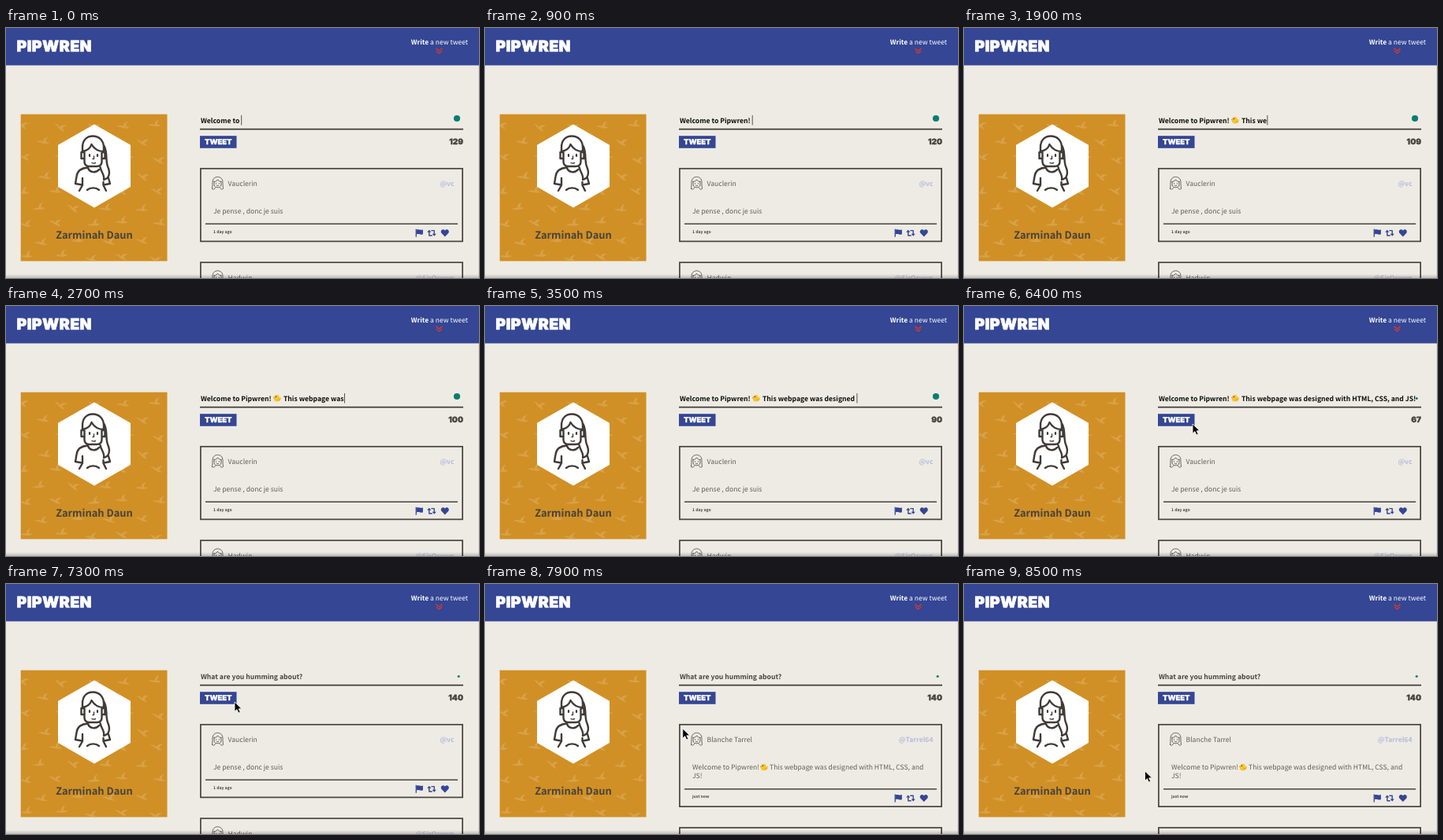
An HTML page that plays this animation: 600x318 px, repeating every 9100 ms.

```html
<!DOCTYPE html>
<html lang="en">
<head>
<meta charset="utf-8">
<title>Pipwren</title>
<style>
  html, body { margin: 0; width: 100%; height: 100%; overflow: hidden; background: #eeebe4; }
  svg { display: block; width: 100vw; height: 100vh; }
  text {
    font-family: "Noto Sans CJK JP", "Noto Sans CJK SC", "Noto Sans CJK", "Noto Sans", sans-serif;
    font-size: 8.6px; fill: #47423d; white-space: pre; text-rendering: geometricPrecision;
  }
  .bold { font-weight: 700; font-size: 8.6px; }
  .light { font-weight: 300; fill: #635d57; }
  .end { text-anchor: end; }
  .typed { fill: #0c0c0c; }
  .handle { fill: #b7bbdd; }
  .white { fill: #fff; }
  .block { font-family: Inter, "DejaVu Sans", sans-serif; font-weight: 900; stroke-linejoin: round; }
</style>
</head>
<body>
<svg id="stage" viewBox="0 0 600 318" preserveAspectRatio="none"></svg>
<script>
const LOOP = 9100, STEP = 100;
const INK = '#47423d', BLUE = '#344694', TEAL = '#087f6c';
const INTRO = 'Welcome to Pipwren! ';
const REST = 'This webpage was designed with HTML, CSS, and JS!';
const BIRD_LEN = 2, GAP_LEN = 2, LIMIT = 140, REST_X = 352;
const BIRD_END = INTRO.length + BIRD_LEN;

// Time, number of characters
const TYPING = [[0, 11], [1900, 31], [3500, 50], [4000, 57], [5200, 69], [5600, 73]];
// Time, x, y of the pointer tip
const POINTER = [[5800, 330, 187], [6000, 316, 184], [6200, 301, 168], [6400, 290, 150],
                 [7400, 290, 150], [7800, 258, 176], [8200, 229, 208], [8500, 229.5, 238]];
const SENT = 7100, POSTED = 7400, CARET_OFF = 6200;

const text = (x, y, str, cls = '', more = '') =>
  `<text x="${x}" y="${y}" class="${cls}" ${more}>${str}</text>`;
const rect = (x, y, w, h, fill) =>
  `<rect x="${x}" y="${y}" width="${w}" height="${h}" fill="${fill}"/>`;
const line = (d, color, width) =>
  `<path d="${d}" fill="none" stroke="${color}" stroke-width="${width}" stroke-linecap="round" stroke-linejoin="round"/>`;
const at = (x, y, body, more = '') => `<g transform="translate(${x} ${y}) ${more}">${body}</g>`;

function random(seed) {
  return () => (seed = (seed * 16807) % 2147483647) / 2147483647;
}

function chick(x, y) {
  return at(x, y, `
    <path d="M-1 -4.3C2 -4.6 3 -2.4 2.6 -1L4.8 -1.2C5 2.6 3 4.3 -.2 4.3C-3.4 4.3 -4.6 2 -4 .2C-4.6 -2.2 -3.4 -4.1 -1 -4.3Z" fill="#f7c531"/>
    <path d="M.2 .8C1.6 2.4 3.2 1.8 3.9 .5C4 3 1.2 3.6 .2 .8Z" fill="#e2922a"/>
    <path d="M-3.9 -1.6L-5.2 -.4L-3.4 .2Z" fill="#e2662a"/>
    <circle cx="-1.6" cy="-1.8" r=".7" fill="#3a2a1c"/>`);
}

function actions(y) {
  return `<g fill="${BLUE}">
    <path d="M519.6 ${y - 5}h1.3v10h-1.3zM521 ${y - 4.2}c2.6 -1.2 4.2 1.2 7.9 -.2v5.8c-3.6 1.5 -5.2 -1 -7.9 .2z"/>
    <path d="M556.8 ${y + 4.6}l-4.3 -4.4c-2.4 -2.9 1.6 -6.8 4.3 -3.5c2.7 -3.3 6.7 .6 4.3 3.5z"/>
    <path d="M534.2 ${y - 1}l2.6 -3l2.6 3zM540.6 ${y + 1}l2.6 3l2.6 -3z"/></g>` +
    line(`M536.8 ${y - 1.4}v4.6h3.4M543.2 ${y + 1.4}v-4.6h-3.4`, BLUE, 1.4);
}

const face = (x, y) => at(x, y, line(
  `M-4.4 -2.4V2C-4.4 6 4.4 6 4.4 2V-2.4
   M-4.6 -2.4C-2 -2.4 -.6 -3.6 0 -5C.8 -3.4 2.4 -2.4 4.6 -2.4
   M-7 6.6C-6.4 3 -6.6 0 -6.4 -2.4C-6 -10.4 6 -10.4 6.4 -2.4C6.6 0 6.4 3 7 6.6C5.600 7.800 4 7.600 3 5.800M-7 6.6C-5.6 7.8 -4 7.6 -3 5.8
   M-1.9 -.2v.6M1.9 -.2v.6M-1.2 2.6Q0 3.4 1.2 2.6`, INK, 0.8));

// y is the top of the card's outer edge
function card(y, name, handle, body, ago, extra = 0) {
  return `<rect x="246.9" y="${y + 1}" width="332.2" height="${92.6 + extra}" fill="none" stroke="${INK}" stroke-width="1.7"/>` +
    face(268.5, y + 20) +
    text(281.5, y + 23.5, name, 'light') +
    text(568.5, y + 23.5, handle, 'bold handle end') +
    body +
    rect(253, y + 70.6 + extra, 320, 1.5, INK) +
    text(263, y + 82.8 + extra, ago, 'bold', 'style="font-size:5.1px"') +
    actions(y + 83 + extra);
}

function birds() {
  const rnd = random(41);
  let out = '';
  for (let row = 0; row < 9; row++) {
    for (let col = 0; col < 5; col++) {
      const x = 28 + col * 42 + (row % 2) * 21 - 8 + rnd() * 8;
      const y = 120 + row * 21 + rnd() * 7;
      out += at(x, y, '<path d="M-10 -1C-6 -3 -2 -2 0 0C1 -4 4 -6 9 -6C6 -4 4.5 -2 4 1C6 1 7 2 9 4C5 4 2 4 0 2.5C-3 2 -5 -1 -10 -1Z"/>',
        `rotate(${Math.round(rnd() * 50 - 25)}) scale(.85)`);
    }
  }
  return `<g fill="#d8a858" opacity=".75" clip-path="url(#panel)">${out}</g>`;
}

const portrait = line(
  `M97 157V152C97 142 103 137.500 110 137.500C119 137.500 124 144 124 152V157
   M97 157C103 156 107 153 108.500 148C112 154 117 157 124 157
   M95.500 158h4v8h-4zM121.500 158h4v8h-4z
   M99.500 166V170C99.500 174 102 176 106 176H115C119 176 121.500 174 121.500 170V166
   M124.500 150C129 158 126 168 129 176C132.500 184 131.500 191 124 193C125.500 187 121 184 119.500 177
   M104 177.500C96 178 90.500 181 89.500 189L88 198L96.500 199.500M97 191V200L93 207
   M104 178C106 184 114 185 118 180
   M130 191L132 198L124 199.500M123.500 196V200L127 207
   M103 206C107 202.500 114 202.500 118 206`, '#403b37', 2.4) +
  line('M106 161v2M116 161v2', '#403b37', 2.2) +
  line('M111.500 163v3.500h-1.500M109 171.500Q111 172.700 113.500 171.500', '#403b37', 1.4);

const later = y => card(y, 'Hadwin', '@SirOswyn', '', '');
const feedBefore = card(177.8, 'Vauclerin', '@vc',
  text(263, 236.4, 'Je pense , donc je suis', 'light'), '1 day ago') + later(297.2);
const feedAfter = card(177.8, 'Blanche Tarrel', '@Tarrel64',
  text(263, 236.2, INTRO.trim(), 'light') + chick(354, 233) +
  text(361, 236.2, REST.slice(0, -4), 'light') +
  text(263, 247.3, REST.slice(-3), 'light'), 'just now', 11.7) + later(309);

const stage = document.getElementById('stage');
stage.innerHTML = `
  <clipPath id="panel"><rect x="18.700" y="109.700" width="185.800" height="186.800"/></clipPath>
  <linearGradient id="shade" x2="0" y2="1">
    <stop stop-opacity="0"/><stop offset="1" stop-opacity=".2"/>
  </linearGradient>
  ${rect(0, 0, 600, 318, '#eeebe4')}
  ${rect(599, 48, 1, 270, '#dedbd5')}
  ${rect(0, 0, 600, 47.5, BLUE)}
  ${text(13.5, 30, 'PIPWREN', 'block white', 'style="font-size:19.6px;stroke:#fff;stroke-width:.7;letter-spacing:.4px"')}
  <text x="586" y="21.3" class="light white end" style="font-size:8.5px;fill:#fff"><tspan font-weight="700">Write</tspan> a new tweet</text>
  ${line('M545.800 26.200L549.500 29L553.200 26.200M546.300 29.500L549.500 32.200L552.700 29.500', '#cc3a35', 1.5)}
  ${rect(18.7, 109.7, 185.8, 186.8, '#d19025')}
  ${birds()}
  <path d="M112 123.500L157 149.300V201.500L112 227.500L67 201.500V149.300Z" fill="#fff" stroke="#fff" stroke-width="2" stroke-linejoin="round"/>
  ${portrait}
  ${text(112, 268, 'Zarminah Daun', 'bold', 'text-anchor="middle" style="font-size:12.9px"')}
  ${text(247, 120.8, 'What are you humming about?', 'bold', 'id="hint"')}
  <g id="draft">
    ${text(247, 120.8, '', 'bold typed', 'id="intro"')}
    <g id="bird">${chick(344, 117.3)}</g>
    ${text(REST_X, 120.8, '', 'bold typed', 'id="rest"')}
    <rect id="caret" y="111" width=".9" height="12.500" fill="${INK}"/>
  </g>
  <circle id="badge" fill="${TEAL}"/>
  ${rect(246, 127.8, 334, 1.8, INK)}
  ${rect(246, 137.2, 46.5, 15.6, BLUE)}
  ${text(252, 148.2, 'TWEET', 'block white', 'style="font-size:9.4px;stroke:#fff;stroke-width:.3"')}
  ${text(580, 148.2, '', 'block end', `id="count" style="font-size:10px;stroke:${INK};stroke-width:.3"`)}
  <g id="before">${feedBefore}</g>
  <g id="after">${feedAfter}</g>
  ${rect(0, 313, 600, 5, 'url(#shade)')}
  <path id="pointer" d="M0 0V12.200L2.900 9.600L4.900 14.100L7.100 13.100L5.100 8.800H9Z" fill="#000" stroke="#fff" stroke-width=".8"/>`;

const ui = {};
for (const id of ['hint', 'draft', 'intro', 'bird', 'rest', 'caret', 'badge', 'count', 'before', 'after', 'pointer'])
  ui[id] = document.getElementById(id);

const show = (el, on) => { el.style.display = on ? '' : 'none'; };

// Linear value of column col in rows that start with a time
function track(rows, t, col) {
  const i = rows.findIndex(row => row[0] >= t);
  if (i < 0) return rows[rows.length - 1][col];
  if (i === 0) return rows[0][col];
  const a = rows[i - 1], b = rows[i];
  return a[col] + (b[col] - a[col]) * (t - a[0]) / (b[0] - a[0]);
}

function caretX(n) {
  if (n < BIRD_END) return 247 + ui.intro.getComputedTextLength();
  if (n <= BIRD_END + GAP_LEN) return 349.5 + n - BIRD_END;
  return REST_X + ui.rest.getComputedTextLength() + 0.4;
}

function draw(t) {
  const sent = t >= SENT;
  const n = Math.floor(track(TYPING, t, 1) + 1e-6);
  show(ui.hint, sent);
  show(ui.draft, !sent);
  ui.count.textContent = sent ? LIMIT : LIMIT - n;
  if (!sent) {
    ui.intro.textContent = INTRO.slice(0, n);
    ui.rest.textContent = REST.slice(0, Math.max(0, n - BIRD_END - GAP_LEN));
    show(ui.bird, n >= BIRD_END);
    show(ui.caret, t < CARET_OFF);
    ui.caret.setAttribute('x', caretX(n));
  }

  const small = n > 70;
  ui.badge.setAttribute('cx', small ? 574.2 : 572);
  ui.badge.setAttribute('cy', small ? 117.5 : 115);
  ui.badge.setAttribute('r', small ? 1.6 : 4.1);

  show(ui.before, t < POSTED);
  show(ui.after, t >= POSTED);
  show(ui.pointer, t >= POINTER[0][0]);
  ui.pointer.setAttribute('transform', `translate(${track(POINTER, t, 1)} ${track(POINTER, t, 2)})`);
}

const start = performance.now();
function tick() {
  const t = (performance.now() - start) % LOOP;
  draw(Math.floor(t / STEP) * STEP);
  requestAnimationFrame(tick);
}
tick();
</script>
</body>
</html>
```
